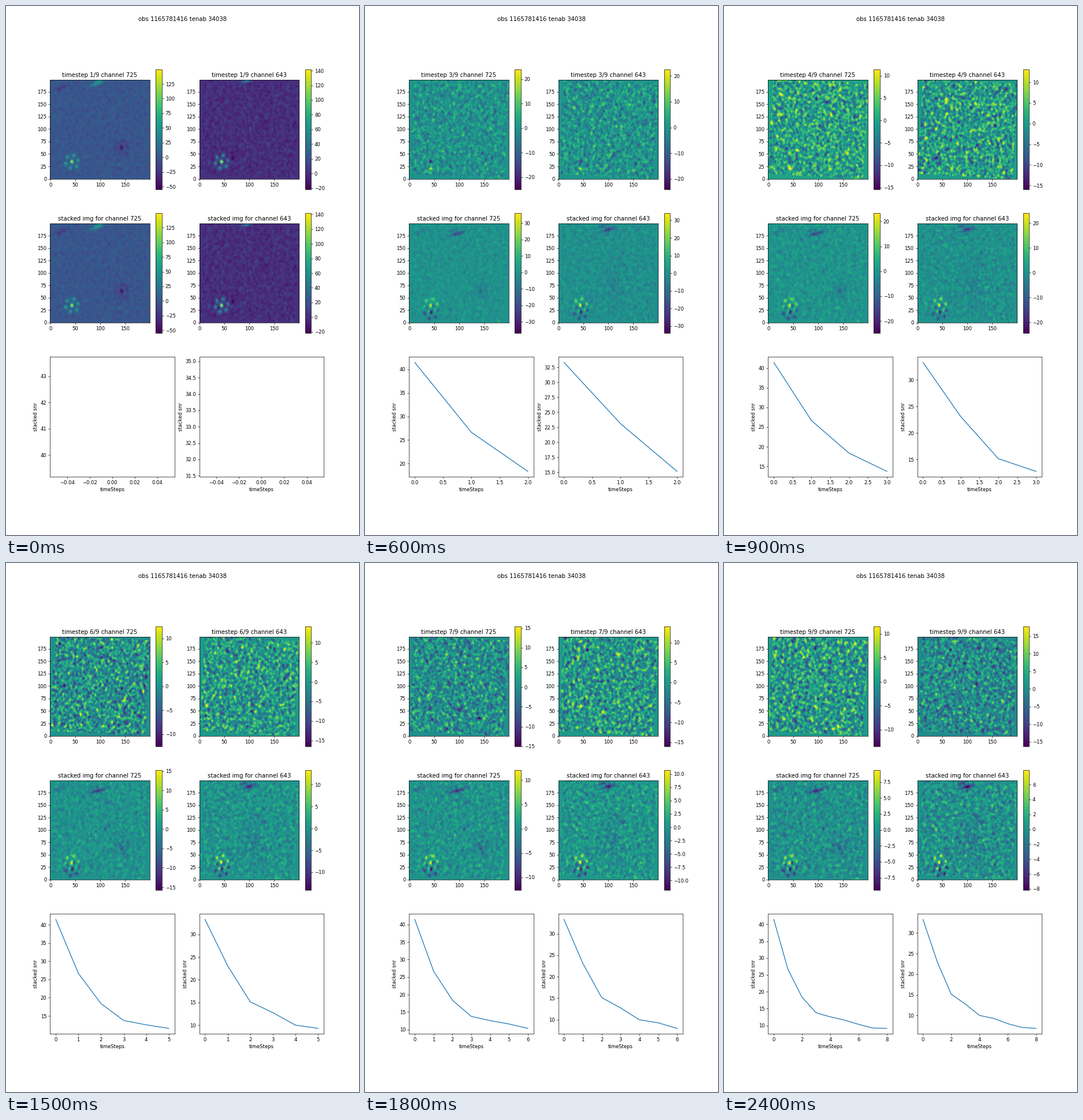
Animation of 611x917 px, one loop 2.7 s. Source, as a matplotlib script:

```python
import numpy as np
import matplotlib.pyplot as plt
from matplotlib.animation import FuncAnimation

DPI = 61.1
SIZE = 200
STEPS = 9
BLUE_CHANNEL, RED_CHANNEL = 725, 643

# Colour limits (low, high) per time step.
STEP_LIMITS = {
    725: [(-54.6, 149.6), (-151.7, 13.1), (-25, 24), (-15.4, 11.4), (-13, 12.4),
          (-12.55, 12.47), (-15, 15.36), (-13.49, 13.14), (-13.45, 11.5)],
    643: [(-21.7, 141.6), (-145.3, 20.4), (-24, 22.5), (-15.9, 13.07), (-15, 14),
          (-16.5, 14.2), (-16, 14), (-15.26, 16.77), (-16.34, 17.7)],
}
STACK_LIMITS = {
    725: [(-54.6, 149.6), (-68.4, 66.4), (-37, 36), (-24.85, 23.3), (-19.2, 18.5),
          (-15.73, 15.2), (-12.6, 12), (-10.54, 10.13), (-9.43, 9.33)],
    643: [(-21.7, 141.6), (-63.3, 64.2), (-34, 34), (-24.3, 23.9), (-17.4, 16.4),
          (-14.07, 13.26), (-11.8, 10.7), (-10.08, 8.75), (-8.15, 7.92)],
}
SNR = {
    725: [41.45, 26.66, 18.37, 13.74, 12.55, 11.58, 10.33, 9.23, 9.13],
    643: [33.3, 23.1, 15.15, 12.76, 10.0, 9.29, 8.0, 7.1, 6.87],
}
NOISE = {725: 3.6, 643: 4.1}
RESIDUAL = [0, 0, 22, 10, 1, 1, 5, 4, 0]

Y, X = np.mgrid[:SIZE, :SIZE].astype(float)
FIELD = ((X - 0.06 * Y > -2) & (X - 0.06 * Y < 190)
         & (Y + 0.06 * X > 10) & (Y + 0.06 * X < 203))


def blob(x, y, amp, sx=2.4, sy=2.6, tilt=0):
    c, s = np.cos(np.radians(tilt)), np.sin(np.radians(tilt))
    u = c * (X - x) + s * (Y - y)
    v = c * (Y - y) - s * (X - x)
    return amp * np.exp(-0.5 * ((u / sx) ** 2 + (v / sy) ** 2))


def beam(x, y, amp, lobe=0.42):
    """Point source with six side lobes."""
    image = blob(x, y, amp, 2.2, 2.8)
    for angle in np.radians(np.arange(15, 375, 60)):
        image += blob(x + 13 * np.cos(angle), y + 13 * np.sin(angle), amp * lobe)
    return image


def sky_noise(channel, step):
    rng = np.random.default_rng(channel * 10 + step)
    k = 2 * np.pi * np.fft.fftfreq(SIZE)
    kx, ky = k[None, :], k[:, None]
    shape = np.exp(-((1.6 * kx) ** 2 + (1.9 * ky) ** 2) / 2)
    shape *= 1 - 0.6 * np.exp(-((6 * kx) ** 2 + (6 * ky) ** 2) / 2)
    noise = np.fft.ifft2(np.fft.fft2(rng.normal(size=(SIZE, SIZE))) * shape).real
    return FIELD * noise * NOISE[channel] / noise.std()


def first_sources(channel):
    image = beam(43.6, 34.3, 150 if channel == BLUE_CHANNEL else 142)
    if channel == BLUE_CHANNEL:
        image += beam(143, 62.5, -52, 0.22) + blob(143, 66, -8, 11, 10)
        image += blob(94, 191, 52, 9, 2.4, 18) + blob(100, 198, 42, 8, 2, 18)
        image += blob(23, 183, -20, 9, 3, 22)
    else:
        image += blob(94, 197, 50, 7, 2.6, 18)
        image += blob(66, 43, -20) + blob(58, 39, -18) + blob(64, 53, -15)
        image += blob(70, 53, -10)
    return image


def second_sources(channel):
    image = beam(43.8, 20.8, -151 if channel == BLUE_CHANNEL else -145)
    if channel == BLUE_CHANNEL:
        image += blob(92, 189, -65, 9, 2.4, 22) + blob(97, 178, -72, 9, 2.4, 18)
        image += blob(97, 197, -40, 7, 2, 18) + blob(23, 183, 6, 9, 3, 22)
    else:
        image += blob(92, 195, -75, 8, 2.4, 22) + blob(99, 186, -72, 8, 2.6, 18)
        image += blob(110, 75, -8, 13, 32)
    return image


def sky(channel, step):
    image = sky_noise(channel, step)
    if step == 0:
        return image + first_sources(channel)
    if step == 1:
        return image + second_sources(channel)
    amp = RESIDUAL[step]
    return image + blob(43.6, 34.3, -amp) + blob(43.8, 20.8, amp)


CHANNELS = (BLUE_CHANNEL, RED_CHANNEL)
IMAGES = {c: np.array([sky(c, s) for s in range(STEPS)]) for c in CHANNELS}
STACKS = {c: np.cumsum(IMAGES[c], axis=0) / np.arange(1, STEPS + 1)[:, None, None]
          for c in CHANNELS}

fig = plt.figure(figsize=((611 + 1e-6) / DPI, (917 + 1e-6) / DPI), dpi=DPI)


def show_map(position, image, limits, title):
    ax = fig.add_subplot(3, 2, position)
    mapped = ax.imshow(image, origin="lower", cmap="viridis",
                       vmin=limits[0], vmax=limits[1])
    ax.set_title(title)
    fig.colorbar(mapped, ax=ax)


def draw(step):
    fig.clear()
    fig.suptitle("obs 1165781416 tenab 34038")
    for column, channel in enumerate(CHANNELS, start=1):
        show_map(column, IMAGES[channel][step], STEP_LIMITS[channel][step],
                 f"timestep {step + 1}/{STEPS} channel {channel}")
        show_map(column + 2, STACKS[channel][step], STACK_LIMITS[channel][step],
                 f"stacked img for channel {channel}")
        ax = fig.add_subplot(3, 2, column + 4)
        ax.plot(SNR[channel][:step + 1])
        ax.set_xlabel("timeSteps")
        ax.set_ylabel("stacked snr")
    return []


animation = FuncAnimation(fig, draw, frames=STEPS, interval=300, repeat=True,
                          repeat_delay=0, init_func=lambda: draw(0))
plt.show()
```
